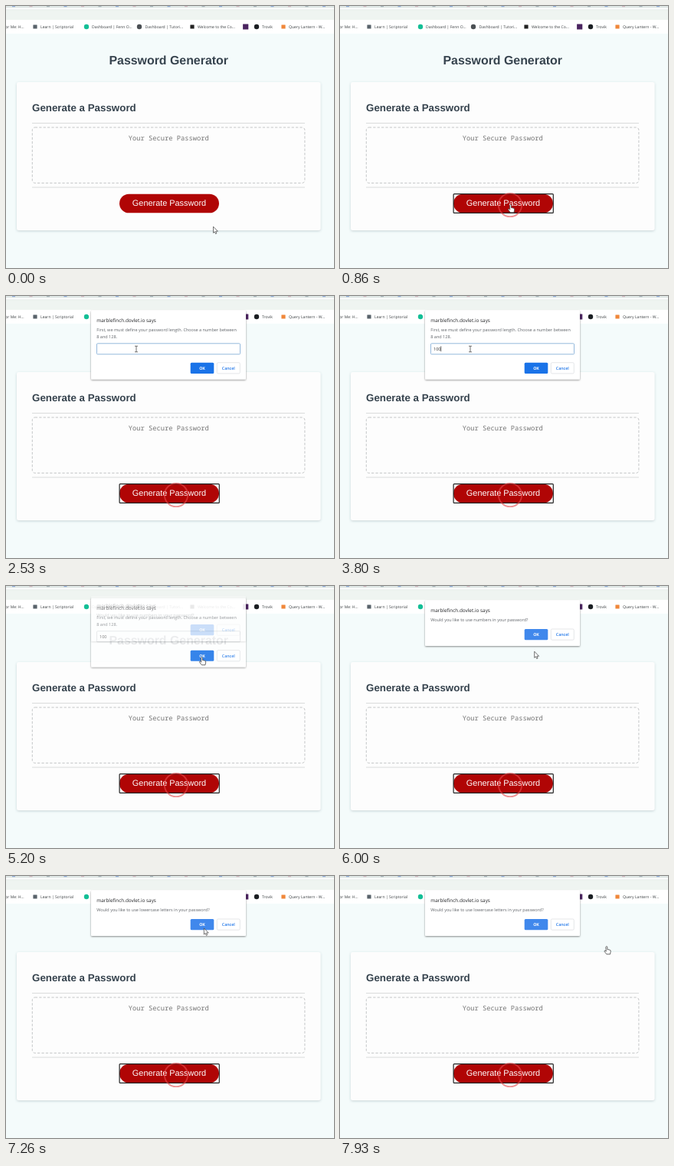
Recreate the animation shown at these times as an HTML page. Size 428 by 341 pixels, loop 8000 ms.

```html
<!DOCTYPE html>
<html lang="en">
<head>
<meta charset="utf-8">
<title>Password Generator</title>
<style>
  html, body { margin: 0; width: 100%; height: 100%; overflow: hidden; background: #f4fbfb; }
  svg { display: block; width: 100vw; height: 100vh; }
  text { text-rendering: geometricPrecision; white-space: pre; }
  .ui { font-family: "Open Sans", "Noto Sans", sans-serif; }
  .page { font-family: "Liberation Sans", Arial, sans-serif; }
  .mono { font-family: "Noto Sans Mono", "DejaVu Sans Mono", monospace; }
  .bold { font-weight: 700; }
  .mid { text-anchor: middle; }
</style>
</head>
<body>
<svg id="stage" viewBox="0 0 428 341">
  <defs>
    <filter id="cardShadow" x="-5%" y="-5%" width="110%" height="112%">
      <feDropShadow dx="0" dy="1" stdDeviation="1.6" flood-color="#415460" flood-opacity=".25"/>
    </filter>
    <filter id="dialogShadow" x="-10%" y="-15%" width="120%" height="135%">
      <feDropShadow dx="0" dy="1" stdDeviation="1.3" flood-color="#000" flood-opacity=".45"/>
    </filter>
  </defs>

  <rect width="428" height="341" fill="#f4fbfb"/>
  <g id="browser" class="ui" font-size="5.1" fill="#3c4043"></g>

  <g class="page" fill="#36434e">
    <text class="bold mid" x="212.2" y="75.6" font-size="15.9">Password Generator</text>
    <rect x="14" y="99" width="396.5" height="193" rx="3" fill="#fdfdfd" filter="url(#cardShadow)"/>
    <text class="bold" x="34" y="137.2" font-size="13.35">Generate a Password</text>
    <path d="M34 152.5H390M34 236H390" stroke="#d6d8d9" stroke-width=".9"/>
    <rect x="34.3" y="158" width="355.6" height="72.4" rx="3.5" fill="none"
      stroke="#c4c6c7" stroke-dasharray="3.3 2.1"/>
    <text class="mono mid" x="212.2" y="174.6" font-size="8.75" fill="#757575">Your Secure Password</text>
    <rect x="148" y="244.7" width="130" height="24.6" rx="12.3" fill="#b00505"/>
    <text class="mid" x="213" y="260.4" font-size="10.9" fill="#fff">Generate Password</text>
  </g>

  <g id="pressed" fill="none">
    <rect x="148.1" y="244.6" width="130.2" height="24.8" rx="1" stroke="#222" stroke-width="1.2"/>
    <circle cx="222" cy="259" r="15.2" stroke="#ea4a4d" stroke-width="1.8" opacity=".6"/>
  </g>

  <g id="dialogs" class="ui"></g>

  <g id="cursor" stroke-linejoin="round" stroke-linecap="round">
    <path id="arrow" d="M0 0V7.8L1.8 6.2L3 9L4.4 8.4L3.2 5.7H5.5Z" fill="#fff" stroke="#444" stroke-width=".75"/>
    <path id="hand" d="M0 .6Q1-.7 1.8 .6V4L4.6 4.5Q6.4 4.9 6.2 6.6L5.5 10.3H.9L-1.9 6.8Q-2.3 5.4-1 5.6L0 6.4Z"
      fill="#fff" stroke="#444" stroke-width=".8"/>
    <path id="beam" d="M-1.6-3.8H-.5Q0-3.8 0-3.2Q0-3.8 .5-3.8H1.6M0-3.2V3.2M-1.6 3.8H-.5Q0 3.8 0 3.2Q0 3.8 .5 3.8H1.6"
      fill="none" stroke="#444" stroke-width=".75"/>
  </g>
</svg>
<script>
const LOOP = 8000;
const $ = id => document.getElementById(id);
const clamp = v => Math.max(0, Math.min(1, v));
const ramp = (t, from, to) => clamp((t - from) / (to - from));
const show = (node, on) => node.setAttribute('visibility', on ? 'visible' : 'hidden');

// Browser chrome: [icon x, icon colour, shape, label x, label]
const bookmarks = [
  [38, '#59636b', 'square', 45, 'Learn | Scriptorial'],
  [105, '#14bf96', 'circle', 112, 'Dashboard | Fenn O...'],
  [174, '#4b5054', 'circle', 181.5, 'Dashboard | Tutori...'],
  [243, '#222', 'square', 250, 'Welcome to the Co...'],
  [312.7, '#4b2460', 'square', 0, ''],
  [327, '#1b1f23', 'circle', 334, 'Trovik'],
  [362, '#f0873a', 'square', 369, 'Query Lantern - W...']
];

function drawBrowser() {
  let out = `<rect width="428" height="36" fill="#fff"/>
    <rect width="428" height="2.5" fill="#dfe7e5"/>
    <rect y="5" width="428" height="13" fill="#eff4f1"/>
    <path d="M0 4.8H428" stroke="#dde5e2" stroke-width=".7"/>`;
  for (let i = 0; i < 19; i++) {
    const colour = ['#6d8fd0', '#c9a0ae', '#8c9aa4'][i % 3];
    out += `<rect x="${8 + i * 22.5}" width="4" height="1.2" fill="${colour}" opacity=".7"/>`;
  }
  out += '<text x="-.8" y="28.8">or Me: H...</text>';
  for (const [x, colour, shape, labelX, label] of bookmarks) {
    const r = shape === 'circle' ? 3.2 : label ? 2.6 : 3.6;
    out += `<rect x="${x - r}" y="${27 - r}" width="${2 * r}" height="${2 * r}"
      rx="${shape === 'circle' ? r : .4}" fill="${colour}"/>
      <text x="${labelX}" y="28.8">${label}</text>`;
  }
  $('browser').innerHTML = out;
}

// The last dialog stays open past the end of the loop.
const dialogs = [
  { open: 1000, close: 5130, prompt: true,
    lines: ['First, we must define your password length. Choose a number between', '8 and 128.'] },
  { open: 5130, close: 6870, lines: ['Would you like to use numbers in your password?'] },
  { open: 6870, close: 2 * LOOP, lines: ['Would you like to use lowercase letters in your password?'] }
];

function dialogMarkup({ prompt, lines }) {
  const buttonY = prompt ? 86.7 : 56;
  const text = lines.map((line, i) =>
    `<text x="118.3" y="${46.4 + i * 8.9}" font-size="5.5" fill="#5f6368">${line}</text>`).join('');
  const field = prompt ? `
    <rect class="field" x="118.5" y="61.8" width="187" height="14" rx="1" fill="#fff"/>
    <text class="value" x="122" y="70.9" font-size="5.5" fill="#333"></text>
    <path class="caret" d="M131.7 65.4V72.2" stroke="#222" stroke-width=".7"/>` : '';
  return `<g>
    <rect x="111" y="18.7" width="202" height="${prompt ? 89.8 : 59.3}" rx="1.5" fill="#fff" filter="url(#dialogShadow)"/>
    <text x="118.3" y="33.8" font-size="6.4" fill="#202124">marblefinch.dovlet.io says</text>
    ${text}${field}
    <rect class="ok" x="240.7" y="${buttonY}" width="30.6" height="14.2" rx="1.5"/>
    <rect x="275.3" y="${buttonY}" width="30" height="14.2" rx="1.5" fill="#fff" stroke="#dadce0" stroke-width=".7"/>
    <g class="mid" font-size="5.3">
      <text class="bold" x="256" y="${buttonY + 9}" fill="#fff">OK</text>
      <text x="290.3" y="${buttonY + 9}" font-weight="600" fill="#1a73e8">Cancel</text>
    </g></g>`;
}

// Pointer path: [time, x, y, ease]
const smooth = p => p * p * (3 - 2 * p);
const linear = p => p;
const path = [
  [0, 270.5, 287.5, linear], [60, 270.5, 287.5, smooth], [800, 221.5, 258.5, linear],
  [1130, 221.5, 258.5, p => p * (.4 + .6 * p)], [1730, 208.5, 168.5, p => p * (2 - p)],
  [2530, 170, 69, linear], [4260, 170, 69, smooth], [5060, 254.5, 92.5, linear],
  [5730, 254.5, 92.5, smooth], [6530, 251.5, 66.5, linear],
  [7130, 251.5, 66.5, smooth], [7930, 347, 91.5, linear], [LOOP, 347, 91.5, linear]
];
const pointers = [[0, 'arrow'], [600, 'hand'], [2130, 'arrow'], [2330, 'beam'],
  [4600, 'arrow'], [4930, 'hand'], [5860, 'arrow'], [7600, 'hand']];
const typed = [[0, ''], [3060, '1'], [3200, '10'], [3330, '100']];
const current = (list, t) => list.filter(([start]) => start <= t).pop()[1];

function pointerAt(t) {
  const i = Math.max(1, path.findIndex(([time]) => time > t));
  const [t0, x0, y0, ease] = path[i - 1], [t1, x1, y1] = path[i];
  const p = ease(ramp(t, t0, t1));
  return [x0 + (x1 - x0) * p, y0 + (y1 - y0) * p];
}

drawBrowser();
$('dialogs').innerHTML = dialogs.map(dialogMarkup).join('');
const dialogNodes = [...$('dialogs').children];
const part = name => dialogNodes[0].querySelector('.' + name);
const [field, value, caret] = ['field', 'value', 'caret'].map(part);

function update(t) {
  show($('pressed'), t >= 730);

  dialogs.forEach(({ open, close, prompt }, i) => {
    const enter = ramp(t, open, open + 270), leave = ramp(t, close, close + 140);
    const node = dialogNodes[i];
    node.setAttribute('opacity', enter * (1 - leave ** 3));
    node.setAttribute('transform', `translate(0 ${-8 * (1 - enter) - 6 * leave})`);
    show(node, enter > 0 && leave < 1);
    const pressed = t >= close - 70;
    node.querySelector('.ok').setAttribute('fill', prompt || pressed ? '#1a73e8' : '#4088ec');
  });
  value.textContent = current(typed, t);
  field.setAttribute('stroke', t < 5060 ? '#94b9dc' : '#d0d3d6');
  field.setAttribute('stroke-width', t < 5060 ? 1 : .7);
  caret.setAttribute('opacity', t >= 3330 && t < 4260 && !(t >= 3660 && t < 3800) ? 1 : 0);

  $('cursor').setAttribute('transform', `translate(${pointerAt(t)})`);
  const shape = current(pointers, t);
  for (const id of ['arrow', 'hand', 'beam']) show($(id), id === shape);
}

const start = performance.now();
function tick() {
  update((performance.now() - start) % LOOP);
  requestAnimationFrame(tick);
}
tick();
</script>
</body>
</html>
```
